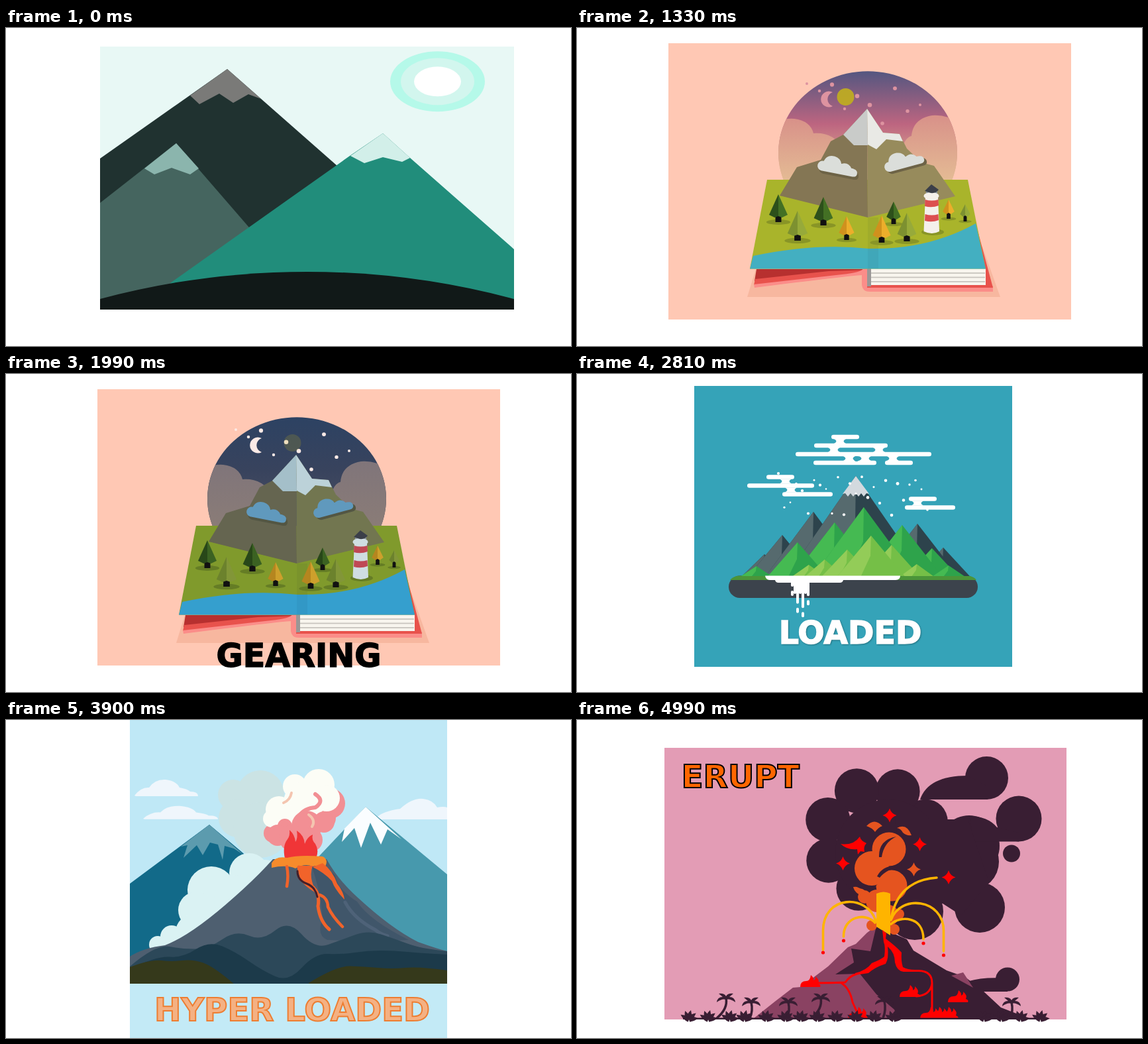
Write an HTML page that moves like this. It is 853 by 480 pixels and loops after 5320 ms.

```html
<!DOCTYPE html>
<html lang="en">
<head>
<meta charset="utf-8">
<title>Volcano stages</title>
<style>
html, body { margin: 0; width: 100%; height: 100%; overflow: hidden; background: #fff; }
svg { display: block; width: 100%; height: 100%; }
text { text-anchor: middle; font-family: "DejaVu Sans", sans-serif; font-weight: 700; }
</style>
</head>
<body>
<svg id="stage" viewBox="0 0 853 480" xmlns="http://www.w3.org/2000/svg"></svg>
<script>
const LOOP = 5320, STEP = 60;

const clamp = v => Math.min(1, Math.max(0, v));
const times = (n, make) => Array.from({ length: n }, (_, i) => make(i)).join('');
const each = (list, make) => list.map(make).join('');

function random(seed) {
  return (a = 0, b = 1) => {
    seed = (seed * 16807) % 2147483647;
    return a + (b - a) * seed / 2147483647;
  };
}

const poly = (pts, fill) => `<polygon points="${pts}" fill="${fill}"/>`;
const path = (d, fill) => `<path d="${d}" fill="${fill}"/>`;
const line = (d, color, w) => `<path d="${d}" fill="none" stroke="${color}" stroke-width="${w}" stroke-linecap="round" stroke-linejoin="round"/>`;
const oval = (x, y, rx, ry, fill) => `<ellipse cx="${x}" cy="${y}" rx="${rx}" ry="${ry}" fill="${fill}"/>`;
const dot = (x, y, r, fill) => oval(x, y, r, r, fill);
const dots = (list, fill) => each(list, ([x, y, r]) => dot(x, y, r, fill));
const rect = (x, y, w, h, fill, r = 0) => `<rect x="${x}" y="${y}" width="${w}" height="${h}" rx="${r}" fill="${fill}"/>`;
const at = (x, y, art, more = '') => `<g transform="translate(${x} ${y}) ${more}">${art}</g>`;
const label = (s, x, y, size, fill, edge, w, more = '') =>
  `<text x="${x}" y="${y}" font-size="${size}" fill="${fill}" stroke="${edge}" stroke-width="${w}" ${more}>${s}</text>`;

function dormant() {
  const sun = [['#b5f9e9', 71.5, 45.5], ['#d2f6ee', 55.5, 35.5], ['#fff', 35.5, 22.5]];
  return rect(142, 28, 625, 397, '#e8f8f5')
    + each(sun, ([fill, rx, ry]) => oval(651.5, 80.8, rx, ry, fill))
    + poly('142,197 334,62 500,208 400,330 142,409', '#203230')
    + poly('278,102 334,62 385,107 366,100 343,113 322,99 292,115', '#7a7a78')
    + poly('142,264 257,174 367,301 300,400 142,412', '#45655f')
    + poly('209,212 257,174 291,212 278,221 250,211 224,221', '#8bb5ad')
    + poly('248,385 519,193 569,159 610,196 767,334 767,412 248,412', '#218d7b')
    + poly('520,193 569,159 610,196 598,202 569,195 541,204', '#d2efe9')
    + path('M142 409A1208 1208 0 0 1 767 409V425H142Z', '#111918');
}

const day = {
  id: 'day', sky: ['#4d5580', '#bd6580', '#e8c295'], cloud: ['#d89189', '#e4bb94'], star: '#dd93a0',
  grass: '#a9b42b', water: '#43afc1', shade: '#899526', rock: ['#847654', '#978b5c'], gap: '#6d6346',
  snow: ['#c9cbc9', '#e9e9e5'], puff: '#dbdeda', tower: '#f4f0eb', red: '#dc4f50',
  trees: [['#2d501b', '#437024'], ['#7d9130', '#97aa3a'], ['#d0911d', '#ecae2b']]
};
const night = {
  id: 'night', sky: ['#2c4263', '#38435d', '#4c4f62'], cloud: ['#80757a', '#8a7c77'], star: '#fbeae6',
  grass: '#809a2c', water: '#359fce', shade: '#657d25', rock: ['#656550', '#727650'], gap: '#535643',
  snow: ['#a4bfc9', '#bcd2d9'], puff: '#6099bd', tower: '#cfdde2', red: '#bf4855',
  trees: [['#284719', '#3b6222'], ['#6c822d', '#829638'], ['#b5861f', '#cda02c']]
};
// x, foot, height, palette entry
const trees = [
  [304, 286, 35, 0], [372, 291, 36, 0], [478, 289, 27, 0], [561, 281, 22, 2], [586, 285, 19, 1],
  [333, 314, 38, 1], [407, 313, 29, 2], [498, 315, 36, 1], [460, 317, 34, 2]
];

function tree([x, y, h, kind], c) {
  const w = h * .4, half = (s, fill) => poly(`0,${-h} ${s * w},-4 ${s * w * .4},0 0,-2`, fill);
  return at(x, y, oval(0, 7, w * 1.3, w * .28, c.shade) + rect(-w * .32, -3, w * .64, 10, '#111')
    + half(-1, c.trees[kind][0]) + half(1, c.trees[kind][1]));
}

function puff(x, y, turn, c) {
  const shape = fill => path('M-24 9A7.500 7.500 0 0 1 -23 -6Q-20 -17 -8 -16Q1 -15 4 -7Q14 -12 20 -3Q31 -3 30 5Q29 9 24 9Z', fill);
  return at(x, y, at(3, 4, shape(c.gap)) + shape(c.puff), `rotate(${turn})`);
}

function gradient(id, colors) {
  return `<linearGradient id="${id}" x2="0" y2="1">`
    + each(colors, (v, i) => `<stop offset="${i / (colors.length - 1)}" stop-color="${v}"/>`) + '</linearGradient>';
}

function book(c) {
  const cloud = `url(#cloud-${c.id})`, rnd = random(77);
  return `<defs>${gradient('sky-' + c.id, c.sky)}${gradient('cloud-' + c.id, c.cloud)}<clipPath id="dome-${c.id}"><path d="M312 230A135 123 0 1 1 566 230Z"/></clipPath></defs>`
    + rect(138, 23, 608, 417, '#ffc8b4')
    + poly('270,364 257,406 639,406 612,330', '#f7b79f')
    + `<g clip-path="url(#dome-${c.id})">` + rect(300, 60, 280, 170, `url(#sky-${c.id})`)
    + path('M300 142Q312 136 328 137Q352 140 357 159Q388 157 400 182V230H300Z', cloud)
    + path('M580 150Q565 130 536 132Q507 137 505 163Q495 165 490 185V230H580Z', cloud) + '</g>'
    + times(10, i => dot(347 + 19 * i, rnd(84, 145), rnd(1.8, 3.3), c.star))
    + path('M386 97A12 12 0 1 0 386 118A11 11 0 0 1 386 97Z', c.star)
    + poly('271,364 440,364 440,369 268,382', '#b7302f')
    + poly('269,379 380,367 440,365 440,371 390,374 267,388', '#e8524c')
    + path('M267 387L400 372Q430 369 432 363H441V389H628V398H442Q431 398 430 388V373Q410 374 268 392Z', '#fb8d89')
    + poly('602,295 628,392 438,392 438,388 617,388', '#e8524c')
    + rect(439, 363, 178, 25, '#f8f5ee')
    + times(3, i => rect(441, 369 + 6.5 * i, 175, 1.8, '#c9c5bf')) + rect(438, 363, 6, 27, '#9a9796')
    + poly('287,229 590,229 617,363.500 261,363.500', c.grass)
    + path('M266 344Q360 324 440 333Q530 335 602 295L617 363.500H261Z', c.water)
    + poly('306,253 332,210 368,199 383,171 402,161 438,122 439,286', c.rock[0])
    + poly('438,122 462,158 487,160 498,182 520,203 539,208 571,254 439,286', c.rock[1])
    + poly('402,161 438,122 439,177 418,177', c.snow[0])
    + poly('438,122 462,158 487,160 492,171 467,168 452,183 439,176', c.snow[1])
    + puff(394, 211, 11, c) + puff(494, 202, -15, c)
    + '<rect x="439" y="286" width="16" height="77" fill="#123" opacity=".05"/>'
    + each(trees, v => tree(v, c))
    + oval(537, 308, 17, 5, c.shade)
    + path('M526 255H545L547 307Q536 313 523.500 307Z', c.tower)
    + times(2, i => path(`M525.500 ${259 + 22 * i}q10 3 20 0l.5 9q-10 4 -21 1Z`, c.red))
    + rect(527, 245, 17, 8, '#89939a') + oval(535, 253.5, 11.5, 5.5, c.tower)
    + path('M525 246L535 236L546 244Q542 250 534 249Z', '#3b3f49');
}

// bars stacked 13px apart, joined by narrow waists
function barCloud(x, y, bars, waists) {
  const waist = ([cx, row]) => path(`M${cx - 9} ${row * 13 + 3}q7 3.500 0 7h18q-7 -3.500 0 -7Z`, '#fff');
  return at(x, y, each(bars, ([a, w, row]) => rect(a, row * 13 - 3.3, w, 6.6, '#fff', 3.3)) + each(waists, waist));
}

function peak([x, y], light, dark) {
  const h = 305 - y, w = h * .6 + 14;
  return poly(`${x},${y} ${x - w},305 ${x + w},305`, dark)
    + poly(`${x},${y} ${x - w},305 ${x - w * .3},305 ${x - 1},${y + h * .5}`, light);
}

function snowcap(x, y, w, h, teeth) {
  let d = `M${x} ${y}L${x - w} ${y + h}`;
  for (let i = 1; i < teeth * 2; i++) d += `L${x - w + i * w / teeth} ${y + h + (i % 2 ? -1 : 4)}`;
  return path(d + `L${x + w} ${y + h}Z`, '#d3d9de');
}

function loaded() {
  const ranges = [
    ['#566a6e', '#2d434c', [[283, 272], [310, 243], [357, 208], [553, 262], [514, 226], [421, 154]]],
    ['#45ba52', '#2ea34b', [[271, 290], [389, 224], [333, 254], [536, 263], [491, 228], [433, 201], [561, 289]]],
    ['#93cc58', '#75bf47', [[350, 288], [374, 280], [475, 258], [408, 265], [513, 287], [444, 244]]]
  ];
  const rnd = random(5);
  const drip = i => {
    const x = 323 + 4 * i, end = i % 2 ? 332 : 321 + 33 * Math.sin(Math.PI * i / 7);
    return rect(x, 308, 4, end - 308, '#fff', 2) + (i % 2 ? '' : rect(x, end + 6, 4, 8, '#fff', 2));
  };
  return rect(177, 18, 480, 424, '#35a3b8')
    + barCloud(330, 95, [[54, 42, 0], [28, 111, 1], [0, 205, 2], [27, 95, 3], [135, 42, 3]], [[67, 0], [58, 1], [126, 1], [81, 2], [105, 2], [147, 2]])
    + dot(422, 128, 4, '#35a3b8')
    + barCloud(257, 155.5, [[29, 42, 0], [0, 101, 1], [53, 76, 2]], [[58, 0], [66, 1]])
    + barCloud(495, 188.5, [[6, 42, 0], [0, 76, 1]], [[19, 0]])
    + rect(229, 304.5, 376, 33.5, '#3c434c', 16.7)
    + path('M245 304.500H589Q599 305 603 311H231Q236 305 245 304.500Z', '#4b9439')
    + each(ranges, ([light, dark, tops], i) => each(tops, v => peak(v, light, dark)) + (i ? '' : snowcap(421, 154, 20, 27, 5)))
    + path('M284 304.500H488Q488 311 481 311H402Q401 315 397 315H304Q300 315 299 311H291Q285 311 284 304.500Z', '#fff')
    + times(7, drip) + times(26, i => dot(304 + 9 * i, rnd(150, 216), rnd(1.2, 2.6), '#fff'));
}

// smooth hill line through evenly spaced heights
function hills(x, w, heights, fill) {
  const s = w / (heights.length - 1);
  let d = `M${x} 399V${heights[0]}`;
  for (let i = 1; i < heights.length - 1; i++) {
    const last = i === heights.length - 2;
    d += `Q${x + i * s} ${heights[i]} ${x + (last ? w : (i + .5) * s)} ${last ? heights[i + 1] : (heights[i] + heights[i + 1]) / 2}`;
  }
  return path(d + 'V399Z', fill);
}

function hyper() {
  const pale = '#eff6fc', pink = '#f28f94', cream = '#fcfdf6', hot = '#f1632a';
  const cloud = (x, y, w) => at(x, y, path('M0 0Q10 -13 22 -12Q31 -25 47 -24Q63 -22 68 -12Q80 -10 84 -6Q96 -6 96 1H2Z', pale), `scale(${w / 96} 1)`);
  return rect(187, 0, 479, 480, '#bfe8f6')
    + cloud(194, 114, 96) + at(207, 149, cloud(0, 0, 113), 'scale(1 .8)')
    + path('M560 147Q568 138 595 134Q614 117 630 119Q645 121 651 132Q661 130 666 132V150H566Z', pale)
    + dots([[384, 112, 36], [343, 113, 23], [350, 148, 29], [385, 166, 42]], '#cbe3e4')
    + poly('187,247 307,158 440,270 440,365 187,365', '#126a89')
    + poly('307,158 358,203 344,194 330,190 327,211 320,188 308,185 297,204 288,189 268,208 274,189 264,191', '#5c9bae')
    + poly('440,240 543,131 666,233 666,352 440,352', '#4799ad')
    + poly('543,131 597,180 576,165 566,188 550,155 536,193 526,163 507,184 511,164', '#fafdff')
    + dots([[367, 231, 30], [391, 235, 24], [310, 257, 36], [288, 287, 28], [250, 327, 17], [229, 339, 13], [282, 320, 26], [350, 270, 36]], '#daf2f3')
    + path('M187 357Q207 344 240 340Q280 325 345 267Q380 236 403 210H484Q500 240 531 268Q582 315 622 335Q650 345 666 349V390H187Z', '#4e5f70')
    + path('M462 222Q478 214 497 235Q500 255 530 274Q548 302 608 332Q540 335 485 332Q468 325 478 300Q474 255 462 222Z', '#40566a')
    + line('M512 275Q525 300 558 317Q565 323 576 326', '#4e6278', 5)
    + hills(187, 479, [372, 338, 346, 345, 317, 334, 301, 346, 332, 317, 330, 345, 349], '#2c4859')
    + hills(187, 479, [376, 356, 359, 333, 350, 378, 396, 352, 354, 348, 348, 352, 354], '#1c3a4a')
    + hills(187, 158, [373, 361, 365, 361, 372, 399], '#35391b')
    + hills(457, 209, [397, 371, 372, 376, 372, 378], '#35391b')
    + rect(187, 398, 479, 82, '#c3eaf6')
    + dots([[489, 126, 23], [480, 148, 18], [403, 171, 14]], pink)
    + dots([[472, 98, 24], [436, 100, 18], [412, 135, 20], [450, 124, 31], [401, 149, 13], [484, 118, 20], [424, 146, 18]], cream)
    + dots([[454, 160, 23], [480, 154, 16], [421, 160, 11], [410, 174, 16], [432, 178, 20], [460, 181, 18]], pink)
    + line('M467 112Q482 122 467 132Q451 133 442 145', pink, 6)
    + line('M419 125Q429 121 431 110M457 143Q468 151 462 161', '#f4c5b0', 4)
    + path('M421 209Q417 190 425 180Q429 175 428 166Q436 173 437 184Q441 178 439 167Q450 174 451 187Q455 176 463 173Q461 181 467 187Q473 197 468 209Z', '#f03537')
    + path('M401 216Q407 205 424 208Q443 203 478 206Q488 211 481 223Q470 219 463 221Q451 216 437 224Q423 218 401 223Z', '#f68b2b')
    + line('M424 221Q427 235 424 251M474 264Q486 269 486 282Q493 297 508 312', hot, 4.5)
    + line('M442 222Q444 240 459 249Q475 259 471 281Q474 304 488 316', hot, 5)
    + path('M478 216Q493 227 500 247Q510 260 511 271Q497 257 492 243Q480 230 463 222Z', hot)
    + path('M443 220H463Q456 239 470 262Q451 252 443 239Z', hot)
    + line('M440 228Q440 242 454 247Q467 252 470 267', '#43202a', 3);
}

function spark([x, y], fill) {
  return at(x, y, path('M0 -10.500Q2.500 -2.500 10.500 0Q2.500 2.500 0 10.500Q-2.500 2.500 -10.500 0Q-2.500 -2.500 0 -10.500Z', fill));
}

function palm([x, y], i, ink) {
  const frond = 'M0 0Q6 -2 14 4Q13 -4 5 -4L11 -9Q3 -10 0 -5Z';
  return at(x, y, path(frond, ink) + at(0, 0, path(frond, ink), 'scale(-1 1)')
    + line(`M0 -2Q3 ${(450 - y) / 2} ${i % 3 ? -2 : -14} ${450 - y}`, ink, 3.5));
}

function erupt() {
  const ink = '#391e33', flame = '#e5541f', gold = '#ffb400', lit = '#8a4262', rnd = random(9);
  const lobe = i => {
    const a = -(20 + 46 * i) * Math.PI / 180;
    return dot(452 + 79 * Math.cos(a), 180 + 79 * Math.sin(a), 33.5, ink);
  };
  const tuft = x => times(5, i => at(x, 452, path('M-4 0Q-3 -9 3 -14Q5 -7 4 0Z', ink), `rotate(${(i - 2) * 36})`));
  const blaze = ([x, y]) => at(x, y, path('M-15 5Q-15 -4 -6 -4Q0 -4 1 -13Q6 -9 5 -5Q9 -7 8 -11Q15 -5 12 0Q17 2 15 5Z', 'red'));
  return rect(132, 42, 607, 410, '#e39cb5')
    + times(6, lobe) + dot(470, 200, 80, ink)
    + dots([[592, 190, 46], [594, 214, 43], [608, 283, 38], [510, 289, 43], [618.5, 87.5, 32.5], [667, 149, 34.5], [656, 201.5, 13], [650, 391.5, 18]], ink)
    + path('M518 120Q530 84 590 84L620 100V120Z', ink) + path('M592 145Q620 145 634 162L667 170V183.500H600Z', ink)
    + poly('480,150 590,150 622,245 580,295 552,277 500,290', ink)
    + path('M560 410Q590 385 650 390V410Z', ink)
    + poly('266,451 300,424 326,404 338,403 379,372 409,343 421,338 438,321 452,311 500,451', lit)
    + poly('452,311 498,331 508,348 558,378 586,388 612,408 640,434 684,451 485,451 479,437 452,414 427,383 390,384 418,366 414,345 443,349', ink)
    + poly('565,386 583,381 598,404', lit)
    + dots([[471, 195, 25.5], [445, 224, 26], [475, 250, 23.5], [453, 273, 17], [434, 267, 10], [445, 310, 8], [479, 316, 8], [486, 293, 8], [470, 295, 16]], flame)
    + path('M417 252Q428 250 437 260L427 264Q419 260 417 252Z', flame)
    + path('M437 160Q449 147 461 160Q455 162 450 169Q446 163 437 160Z', flame) + path('M483 163Q498 155 505 174Q497 175 492 170Q489 164 483 163Z', flame)
    + path('M456 207Q455 181 482 176Q463 185 460 207ZM453 236Q463 216 492 221Q468 224 457 238ZM419 244Q438 257 454 248Q438 262 419 250Z', ink)
    + path('M452 262Q463 257 473 262V325L452 312Z', gold)
    + line('M371.500 347V318C371.500 264 438 262 451 303M402.500 327C402 296 436 290 450 306M474 300Q485 242 543 238M474 302C488 262 553.500 270 553.500 318V349M474 308C488 295 523 296 523 331', gold, 3.6)
    + each([[371.5, 351], [402.5, 333], [553.5, 355], [523, 337]], ([x, y]) => dot(x, y, 2.6, 'red'))
    + each([[472, 144], [517.5, 187.5], [401.5, 216.5], [561, 237.5]], v => spark(v, 'red')) + spark([508.5, 225.5], flame)
    + path('M398 187Q417 190 427 176Q428 182 437 186Q432 191 434 199L428 198L424 203L423 195Q409 197 398 187Z', 'red')
    + path('M461 317L467 322L466 330Q481 341 490 351Q489 364 492 373Q499 377 510 377V380H493Q483 379 480 366Q480 351 469 342Q471 360 466 368Q450 373 440 382L420 385V382Q437 378 445 367Q460 361 464 357Q466 342 463 335Z', 'red')
    + line('M422 383.500Q412 386 405 396Q385 397 364 397M399 397Q412 405 416 426L425 446M496 378.500H516Q536 379 536 397V444M536 398Q533 416 512 417', 'red', 3)
    + each([[352, 398], [424, 446], [502, 413], [575, 421], [533, 446], [546, 446], [560, 446]], blaze)
    + times(20, i => i > 11 && i < 16 ? '' : tuft(173 + 27.6 * i + rnd(-4, 4)))
    + each([[225, 422], [263, 428], [319, 428], [368, 422], [464, 426], [656, 428]], (v, i) => palm(v, i, ink))
    + rect(160, 449.5, 550, 2.5, ink);
}

const shadow = 'style="filter:drop-shadow(1.5px 1.5px 1px rgba(0,0,0,.3))"';
const sun = '<circle id="sun" cy="104" r="13" fill="#c0ae1f"/>';

// start, art, caption, caption start, fade steps
const scenes = [
  [0, dormant(), label('DORMANT', 442, 316, 47.3, '#fff', '#fff', 1.5), 330, 7],
  [1020, book(day) + `<g id="night">${book(night)}</g>` + sun, label('GEARING', 442, 441.5, 49, '#000', '#000', 1.5), 1450, 6],
  [2050, loaded(), label('LOADED', 412.5, 407, 47.5, '#fff', '#fff', 1.5, shadow), 2510, 6],
  [3140, hyper(), label('HYPER LOADED', 432, 453.5, 48.2, '#f4b183', '#ed7d31', 2), 3540, 7],
  [4230, erupt(), label('ERUPT', 246.7, 102, 48.5, '#f60', '#000', 2), 4690, 6]
];

const stage = document.getElementById('stage');
stage.innerHTML = each(scenes, ([, art, text]) => `<g class="scene">${art}<g class="caption">${text}</g></g>`);
const groups = [...stage.querySelectorAll('.scene')];
const captions = [...stage.querySelectorAll('.caption')];
const nightLayer = document.getElementById('night');
const sunDot = document.getElementById('sun');

function draw(t) {
  scenes.forEach(([from, , , show, steps], i) => {
    const to = i + 1 < scenes.length ? scenes[i + 1][0] : LOOP;
    groups[i].style.display = t >= from && t < to ? '' : 'none';
    captions[i].style.opacity = clamp((Math.floor((t - show) / STEP) + 1) / steps);
  });
  const p = Math.max(-.47, Math.floor((t - 1330) / STEP) * STEP / 660);
  nightLayer.style.opacity = clamp(p);
  sunDot.setAttribute('cx', 405.5 + 27 * p);
  sunDot.style.opacity = clamp(.92 - .72 * p);
}

const begin = performance.now();
function tick() {
  draw((performance.now() - begin) % LOOP);
  requestAnimationFrame(tick);
}
tick();
</script>
</body>
</html>
```
